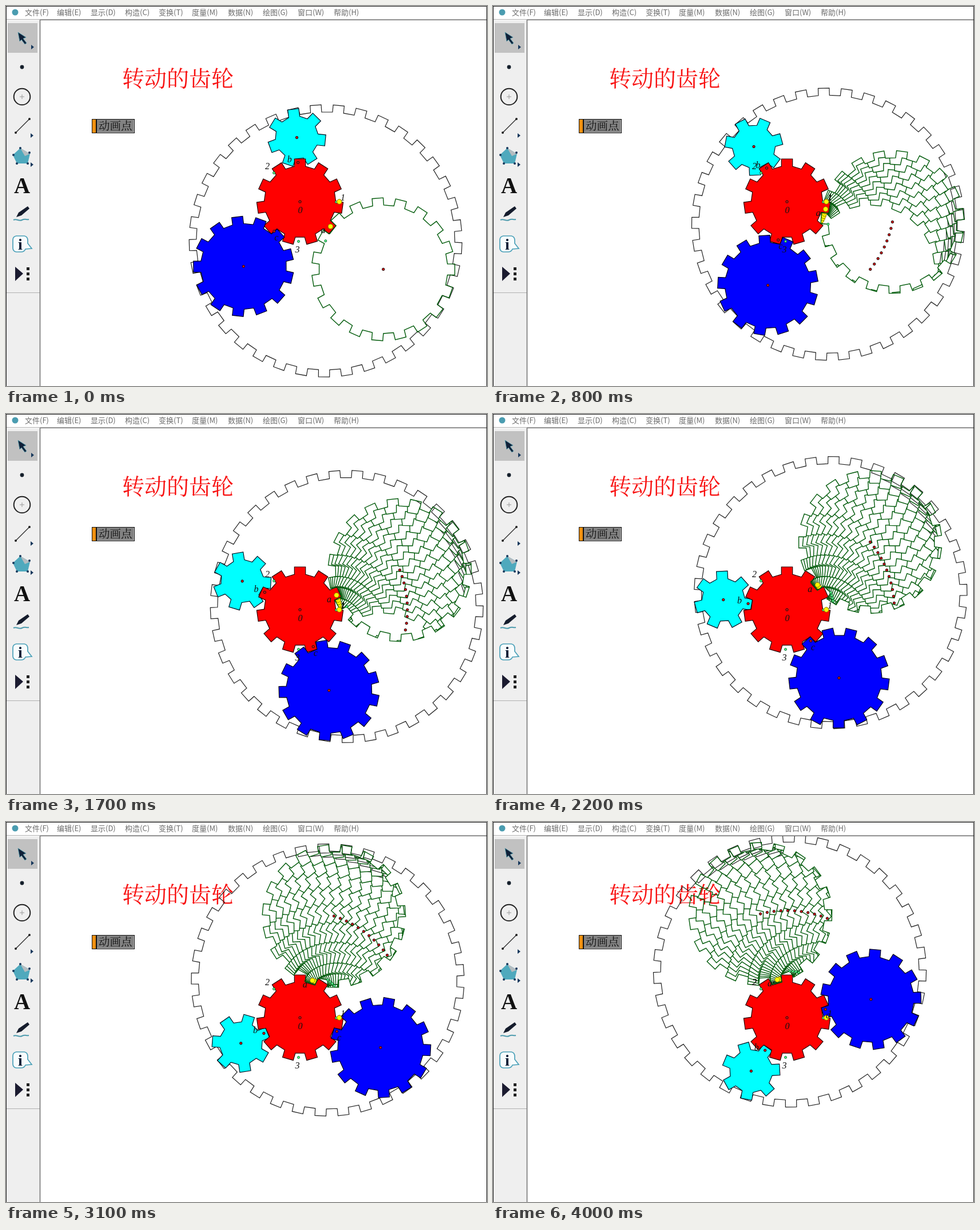
Animation of 841x666 px, one loop 4100 ms. Source, as an HTML page with a canvas:

```html
<!DOCTYPE html>
<html lang="zh">
<head>
<meta charset="utf-8">
<title>转动的齿轮</title>
<style>
  html, body { margin: 0; width: 100%; height: 100%; overflow: hidden; background: #fff; }
  svg, canvas { position: absolute; left: 0; top: 0; display: block; }
  .cjk { font-family: "Noto Sans CJK SC", "Noto Sans CJK", sans-serif; }
  .song { font-family: "Noto Serif CJK SC", "Noto Sans CJK SC", "Noto Sans CJK", serif; font-weight: 300; }
  .roman { font-family: "Liberation Serif", serif; font-weight: bold; }
</style>
</head>
<body>
<svg width="841" height="666" viewBox="0 0 841 666">
  <rect width="841" height="666" fill="#fff"/>
  <rect y="25" width="59" height="641" fill="#efefef"/>
  <path d="M0 23.5H841M0 502.5H59" stroke="#b0b0b0"/>
  <path d="M59 24.5H841" stroke="#707070"/>
  <path d="M59.5 24V666" stroke="#777" stroke-width="1.6"/>
  <path d="M0 .5H840.5V666M.5 0V666" fill="none" stroke="#222"/>
  <circle cx="16" cy="11" r="5.5" fill="#4a9cb0"/>
  <g id="menu" class="cjk" font-size="13" fill="#6c6c6c"></g>

  <rect x="3" y="30" width="52" height="52" fill="#c1c1c1"/>
  <path d="M21 46L35 55 30 57 36 65 33 67 27 59 24 62Z" fill="#102038" stroke="#4f9cae" stroke-width=".8"/>
  <path d="M44 68L49 72 44 76ZM43 223L48 227 43 231ZM43 274L48 278 43 282Z" fill="#17385c"/>
  <circle cx="28" cy="107" r="3.4" fill="#16202c"/>
  <circle cx="28" cy="159" r="14.3" fill="none" stroke="#222" stroke-width="2"/>
  <path d="M24 159H32M28 155V163" stroke="#999"/>
  <path d="M17 222L41 198" stroke="#333" stroke-width="1.4"/>
  <circle cx="17" cy="222" r="2" fill="#222"/>
  <circle cx="41" cy="198" r="2" fill="#222"/>
  <path d="M25 249L42 259 38 276 19 276 12 261Z" fill="#4fa9bd"/>
  <path d="M25 249L42 259 33 263Z" fill="#b4bcc0"/>
  <g fill="#17385c"><circle cx="25" cy="249" r="2"/><circle cx="41" cy="257" r="2"/><circle cx="38" cy="276" r="2"/><circle cx="19" cy="276" r="2"/><circle cx="13" cy="261" r="2"/></g>
  <text class="roman" x="28" y="328" font-size="39" text-anchor="middle" fill="#111">A</text>
  <path d="M18 370L22 362 38 351 41 355 27 367Z" fill="#151c2c"/>
  <path d="M13 375C19 372 22 378 28 375S35 375 40 374" fill="none" stroke="#4f9cae" stroke-width="2"/>
  <path d="M18 403H32Q38 404 38 411V416L45 425 34 426Q32 431 26 431H18Q12 430 12 424V410Q12 404 18 403Z" fill="#f8fcfd" stroke="#4aa0b8" stroke-width="1.7"/>
  <text class="roman" x="25" y="427" font-size="28" text-anchor="middle" fill="#102038">i</text>
  <path d="M16 457L30 469 16 482Z" fill="#1b1b30"/>
  <path d="M36 458H41V463H36ZM36 467H41V472H36ZM36 476H41V481H36Z" fill="#222"/>

  <text class="song" x="203" y="141" font-size="39" fill="#f81010">转动的齿轮</text>
  <rect x="150.5" y="198.5" width="74" height="24" fill="#828282" stroke="#111"/>
  <path d="M158 221.5H223.5V200" fill="none" stroke="#b8b8b8"/>
  <rect x="151" y="199" width="6" height="23" fill="#f09010"/>
  <path d="M158 199V222" stroke="#111" stroke-width="2"/>
  <text class="song" x="162" y="217" font-size="19.5" fill="#111">动画点</text>
</svg>
<canvas id="stage" width="841" height="666"></canvas>
<script>
const menu = document.getElementById("menu");
const items = "文件(F) 编辑(E) 显示(D) 构造(C) 变换(T) 度量(M) 数据(N) 绘图(G) 窗口(W) 帮助(H)".split(" ");
const menuX = [33, 89, 148, 208, 267, 325, 388, 449, 510, 573];
items.forEach((label, i) => {
  const text = document.createElementNS("http://www.w3.org/2000/svg", "text");
  text.setAttribute("x", menuX[i]);
  text.setAttribute("y", 16);
  text.textContent = label;
  menu.append(text);
});

const ctx = document.getElementById("stage").getContext("2d");
const STEP = 100, LOOP = 4100;
const SUN = { x: 513.5, y: 342.5, teeth: 11, pitch: 68.8 };
const ADDENDUM = 6.2, TOOTH = 9.7;
const ORBIT = [[0, 39.1], [8, 10.9], [17, -21.7], [22, -39.2], [28, -60.8], [35, -85.9], [40, -104.3]];
const rad = deg => deg * Math.PI / 180;

function orbitAt(n) {
  const i = Math.max(1, ORBIT.findIndex(([k]) => k >= n));
  const [k0, a0] = ORBIT[i - 1], [k1, a1] = ORBIT[i];
  return a0 + (a1 - a0) * (n - k0) / (k1 - k0);
}

function polar(r, deg) {
  return { x: SUN.x + r * Math.cos(rad(deg)), y: SUN.y + r * Math.sin(rad(deg)) };
}

// Square-toothed outline, with one tooth centred on angle `turn`.
function gearPath(c, teeth, pitch, turn) {
  const path = new Path2D();
  const inner = pitch - ADDENDUM, outer = pitch + ADDENDUM;
  const foot = Math.sqrt(inner * inner - TOOTH * TOOTH);
  for (let i = 0; i < teeth; i++) {
    const a = rad(turn + i * 360 / teeth), cos = Math.cos(a), sin = Math.sin(a);
    for (const [u, v] of [[foot, -TOOTH], [outer, -TOOTH], [outer, TOOTH], [foot, TOOTH]])
      path.lineTo(c.x + u * cos - v * sin, c.y + u * sin + v * cos);
  }
  path.closePath();
  return path;
}

// A planet rolling around the fixed sun, meshed with its teeth.
function planet(angle, dist, teeth, pitch) {
  const c = polar(dist, angle);
  const turn = angle + 180 + ((angle + 90) * SUN.teeth + 180) / teeth;
  return { c, path: gearPath(c, teeth, pitch, turn), touch: polar(SUN.pitch, angle) };
}

function paint(path, stroke, fill, width = 1.2) {
  if (fill) {
    ctx.fillStyle = fill;
    ctx.fill(path);
  }
  ctx.lineWidth = width;
  ctx.strokeStyle = stroke;
  ctx.stroke(path);
}

function dot({ x, y }, r, fill, stroke = "#111") {
  const path = new Path2D();
  path.arc(x, y, r, 0, 2 * Math.PI);
  paint(path, stroke, fill, 1);
}

function label(text, x, y) {
  ctx.fillStyle = "#111";
  ctx.fillText(text, x, y);
}

function drawStep(n) {
  const a = orbitAt(n);
  const green = planet(a, 187.8, 19, 118.7);
  const blue = planet(a + 91.95, 150.3, 13, 81.3);
  const cyan = planet(a + 228.1, 112.6, 7, 43.8);
  const hub = polar(82, a + 17.8);
  const ring = gearPath(hub, 37, 232.2, 3.1 + (a - 39.1) * (1 + SUN.teeth / 37));

  // Older drawing survives only inside the green gear.
  if (n === 0) ctx.clearRect(-1, -1, 843, 668);
  else {
    ctx.globalCompositeOperation = "destination-in";
    ctx.fillStyle = "#000";
    ctx.fill(green.path);
    ctx.globalCompositeOperation = "source-over";
  }

  ctx.save();
  ctx.beginPath();
  ctx.rect(60.5, 24.5, 779, 641);
  ctx.clip();
  paint(ring, "#222");
  paint(cyan.path, "#012", "#0ff");
  paint(gearPath(SUN, SUN.teeth, SUN.pitch, -90), "#200", "#f00");
  paint(blue.path, "#001", "#00f");
  paint(green.path, "#005a0a", null, 1.4);

  for (const p of [SUN, green.c, blue.c, cyan.c, cyan.touch, blue.touch]) dot(p, 2.2, "#d01010");
  for (const [x, y] of [[577, 343], [468, 292], [511, 412], [hub.x, hub.y]]) dot({ x, y }, 2, "#6f8", "#063");
  dot({ x: 582.3, y: 342.5 }, 4.3, "#ff0", "#860");
  dot(green.touch, 4.3, "#ff0", "#860");

  label("0", 514, 362);
  label("1", 588.5, 340);
  label("2", 456.5, 285);
  label("3", 509, 431);
  label("a", green.touch.x - 13, green.touch.y + 12);
  label("b", cyan.touch.x - 15, cyan.touch.y);
  label("c", blue.touch.x + 4, blue.touch.y + 16);
  ctx.restore();
}

ctx.translate(0.5, 0.5);
ctx.textAlign = "center";
ctx.font = 'italic 16px "Liberation Serif", serif';

const start = performance.now();
let shown = -1;
function tick() {
  const n = Math.floor((performance.now() - start) % LOOP / STEP);
  if (n < shown) shown = -1;
  while (shown < n) drawStep(++shown);
  requestAnimationFrame(tick);
}
tick();
</script>
</body>
</html>
```
